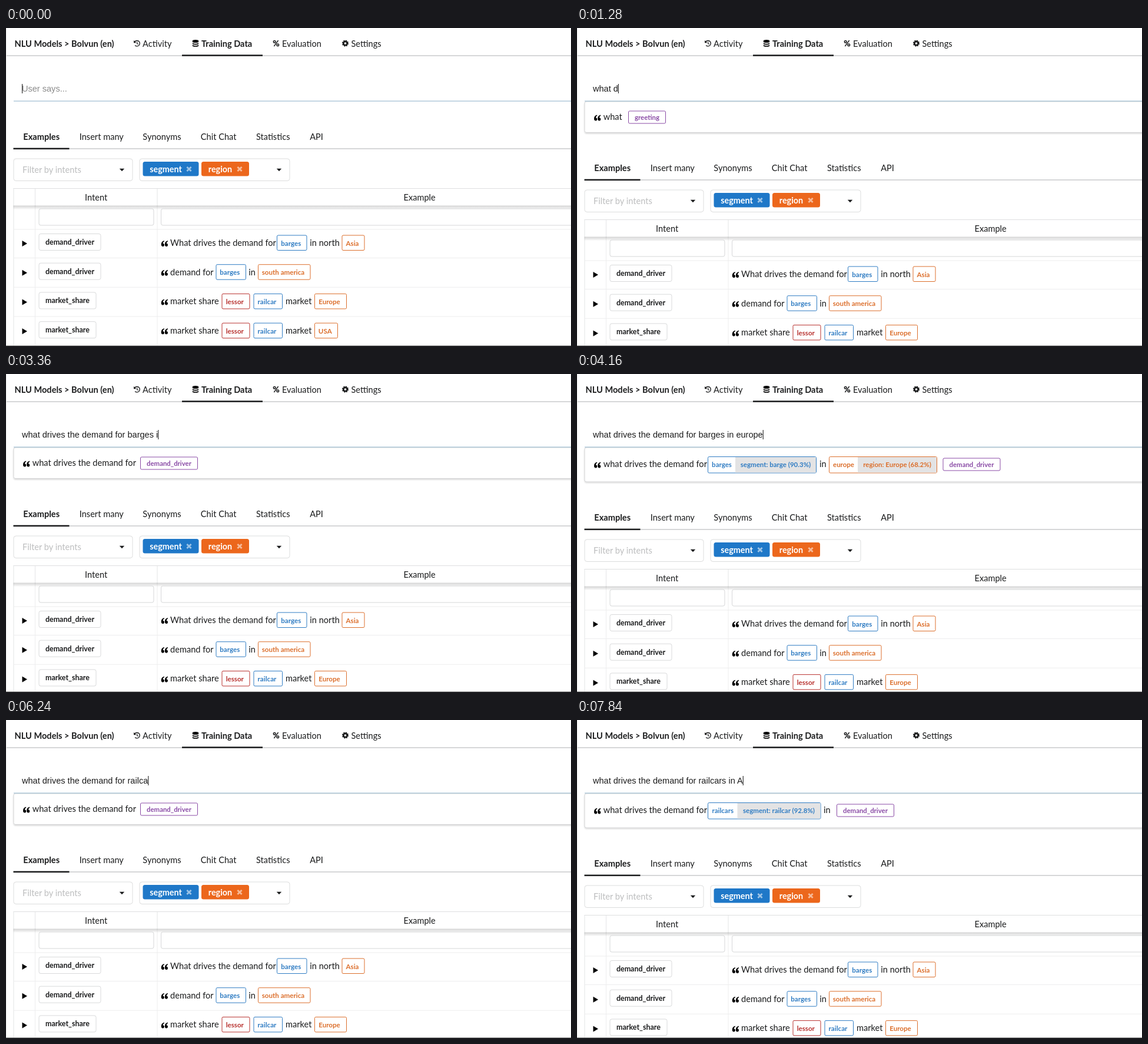
Write an HTML page that moves like this. It is 960 by 540 pixels and loops after 8 s.

```html
<!DOCTYPE html>
<html lang="en">
<head>
<meta charset="utf-8">
<title>Training data</title>
<style>
  html, body { margin: 0; width: 100%; height: 100%; overflow: hidden; background: #fff; }
  svg { display: block; width: 960px; height: 540px; }
  text { font-family: Lato, sans-serif; font-size: 14.6px; fill: #262728; white-space: pre; }
  .b { font-weight: 700; }
  .input { font-family: "Liberation Sans", Arial, sans-serif; font-size: 14.55px; }
  .mid { text-anchor: middle; }
</style>
</head>
<body>
<svg id="stage" viewBox="0 0 960 540"></svg>
<script>
const LOOP = 8000, STEP = 160;
const INK = '#1b1c1d', LINE = '#d6d7d8', SOFT = '#ededee';
const BLUE = '#2f7cc3', ORANGE = '#dc6f2c', RED = '#b8322f', PURPLE = '#8a4ba6';

const rect = (x, y, w, h, fill, extra = '') =>
  `<rect x="${x}" y="${y}" width="${w}" height="${h}" fill="${fill}" ${extra}/>`;
const box = (x, y, w, h, stroke = LINE, r = 3, fill = '#fff') =>
  rect(x + .5, y + .5, w - 1, h - 1, fill, `stroke="${stroke}" rx="${r}"`);
const text = (x, y, s, { cls = '', fill = INK, size = 14.6 } = {}) =>
  `<text x="${x}" y="${y}" class="${cls}" style="font-size:${size}px;fill:${fill}">${s}</text>`;
const path = (d, extra = '') => `<path d="${d}" ${extra}/>`;
const at = (x, y, s) => `<g transform="translate(${x} ${y})">${s}</g>`;

const mark = 'M5 0C1.8 .9 0 3.2 0 6.6C0 8.8 1 10 2.6 10C4.1 10 5.2 9 5.2 7.4C5.2 5.9 4.3 4.9 2.9 4.8C3 3.3 3.8 2.2 5.2 1.5Z';
const quote = (x, y) => at(x, y, path(mark) + at(6.1, 0, path(mark)));
const arrowDown = (x, y) => path(`M${x - 4.2} ${y - 2}h8.4l-4.2 4.4z`, `fill="${INK}"`);
const cross = (x, y) =>
  path(`M${x - 3.6} ${y - 3.6}l7.2 7.2m0 -7.2l-7.2 7.2`, 'stroke="#fff" stroke-opacity=".55" stroke-width="2.8"');

const icons = {
  history: path('M-3.6 -2.8A4.7 4.7 0 1 1 -3.3 3.4', 'fill="none" stroke="#1b1c1d" stroke-width="1.4"') +
    path('M-5.4 -5v4.2h4.2z') +
    path('M.2 -2.6V.4L2.2 1.6', 'fill="none" stroke="#1b1c1d" stroke-width="1.2"'),
  database: [-2.6, .8, 4.2].map(y => path(`M-5.2 ${y - 1.4}Q0 ${y + 1.4} 5.2 ${y - 1.4}V${y}C5.2 ${y + 2.2} -5.2 ${y + 2.2} -5.2 ${y}Z`)).join('') +
    '<ellipse cy="-4.2" rx="5.2" ry="1.9"/>',
  percent: path('M3.6 -5L-3.6 5', 'stroke="#1b1c1d" stroke-width="1.4"') +
    [[-2.8, -2.7], [2.8, 2.7]].map(([x, y]) =>
      `<circle cx="${x}" cy="${y}" r="1.8" fill="none" stroke="#1b1c1d" stroke-width="1.5"/>`).join(''),
  cog: '<circle r="3.2" fill="none" stroke="#1b1c1d" stroke-width="2.7"/>' +
    '<circle r="4.7" fill="none" stroke="#1b1c1d" stroke-width="1.8" stroke-dasharray="2 1.69"/>'
};

function header() {
  const item = (icon, ix, x, s, cls = '') => at(ix, 26, icons[icon]) + text(x, 31.5, s, { cls });
  return rect(0, 46, 960, 2, LINE) + rect(299, 45.3, 137, 2.5, INK) +
    text(14.5, 31.5, 'NLU Models &gt; Bolvun (en)', { cls: 'b' }) +
    item('history', 222.5, 232, 'Activity') +
    item('database', 322, 332, 'Training Data', 'b') +
    item('percent', 459, 469, 'Evaluation') +
    item('cog', 576.5, 586.5, 'Settings');
}

function tabs() {
  const names = [['Insert many', 162.3], ['Synonyms', 265], ['Chit Chat', 361.2], ['Statistics', 453.7], ['API', 527.5]];
  return rect(13, 204, 947, 2, LINE) + rect(12.5, 203.6, 95, 2.5, INK) +
    text(60.2, 190.2, 'Examples', { cls: 'b mid' }) +
    names.map(([s, x]) => text(x, 190.2, s, { cls: 'mid' })).join('');
}

function filters() {
  const chip = (x, w, s, fill, tx, cx) => rect(x, 227, w, 24.5, fill, 'rx="3.5"') +
    text(tx, 244.6, s, { cls: 'b mid', fill: '#fff', size: 14.4 }) + cross(cx, 239.5);
  return box(12.5, 221.5, 203, 38.5, '#dcdddd', 4) +
    text(28, 246, 'Filter by intents', { fill: '#bdbebf' }) + arrowDown(197, 240.8) +
    box(226.5, 221.5, 256, 38.5, '#dcdddd', 4) +
    chip(232.5, 95, 'segment', '#1f78c8', 271.5, 311) +
    chip(332, 81, 'region', '#ec671c', 364, 397) + arrowDown(464, 240.8);
}

const label = (x, y, w, h, s, color, cx) =>
  box(x, y, w, h, color, 2) +
  text(cx, y + h / 2 + 5, s, { cls: 'b mid', fill: color, size: 11.6 });

function row(i, intent, w, parts) {
  const y = 365 + i * 49.7;
  return rect(13, y + 25, 947, 1, SOFT) +
    path(`M27.5 ${y - 4}l8.5 5l-8.5 5z`) +
    box(55.5, y - 16, w, 29, '#d9dadb') +
    text(55.5 + w / 2, y + 2.8, intent, { cls: 'b mid', size: 12.5 }) +
    quote(263.7, y - 4) +
    parts.map(([x, s, bw, color, cx]) => bw
      ? label(x, y - 13.5, bw, 26.5, s, color, cx)
      : text(x, y + 4.8, s)).join('');
}

function table() {
  const market = (region, w, cx) => [[279, 'market share'], [366.5, 'lessor', 48, RED, 388.8],
    [420.5, 'railcar', 49.5, BLUE, 443.5], [475, 'market'], [524, region, w, ORANGE, cx]];
  return rect(12.5, 272, 947.5, 1, '#dedfe0') +
    rect(12.5, 272, 1, 268, '#e4e5e6') +
    [49, 256.5].map(x => rect(x, 273, 1, 30, '#e4e5e6') + rect(x, 303, 1, 240, SOFT)).join('') +
    text(153.2, 293.2, 'Intent', { cls: 'mid' }) + text(702.6, 293.2, 'Example', { cls: 'mid' }) +
    rect(12.5, 301.5, 948, 7, 'url(#fade)') +
    box(55.5, 306.5, 196, 29) + box(263, 306.5, 720, 29) +
    rect(13, 341.5, 947, 1, SOFT) +
    row(0, 'demand_driver', 106, [[279, 'What drives the demand for'], [460, 'barges', 51.5, BLUE, 484.3],
      [516.3, 'in north'], [570.5, 'Asia', 39, ORANGE, 588.5]]) +
    row(1, 'demand_driver', 106, [[279, 'demand for'], [356.5, 'barges', 51.5, BLUE, 380.3],
      [412.3, 'in'], [428, 'south america', 89.5, ORANGE, 471]]) +
    row(2, 'market_share', 98, market('Europe', 55, 549.5)) +
    row(3, 'market_share', 98, market('USA', 40, 542.3));
}

const LEAD = 'what drives the demand for';

// Result panel: leading words, intent tag [name, x, width], entities and plain words.
const plain = (words, x, name = 'demand_driver', w = 98) => ({ words, tag: [name, x, w], parts: [] });
const barge = [222, 185, 47, 'barges', 'segment: barge (90.3%)', BLUE];
const europe = [428, 184, 49, 'europe', 'region: Europe (68.2%)', ORANGE];
const railcar = [222, 192.5, 50.5, 'railcars', 'segment: railcar (92.8%)', BLUE];
const rich = (x, ...parts) => ({ words: LEAD, tag: ['demand_driver', x, 98], parts });

const panels = [
  [0, null],
  [1280, plain('what', 87, 'greeting', 64)],
  [2080, plain('what drives', 129)],
  [2400, plain('what drives the', 153)],
  [2880, plain('what drives the demand', 207)],
  [3040, plain(LEAD, 228)],
  [3520, rich(417, barge)],
  [3680, rich(434, barge, [412, 'in'])],
  [4000, rich(621.5, barge, [412, 'in'], europe)],
  [5760, plain(LEAD, 228)],
  [6880, rich(424, railcar)],
  [7680, rich(441, railcar, [419, 'in'])]
];

function entity([x, w, split, name, value, color]) {
  return box(x, 140, w, 28.5, color, 2) +
    rect(x + split, 141, w - split - 1, 26.5, '#e3e3e4') +
    text(x + 7 + (split - 13) / 2, 157.7, name, { cls: 'b mid', fill: color, size: 11.5 }) +
    text(x + (split + w) / 2 - .5, 157.7, value, { cls: 'b mid', fill: color, size: 11.5 });
}

function panelMarkup(p) {
  if (!p) return '';
  const tall = p.parts.length > 0, mid = tall ? 153.5 : 151.5;
  const [name, x, w] = p.tag;
  return `<g filter="url(#drop)">${box(12.5, 124.5, 960, tall ? 59 : 53.5, '#d2d3d4', 3)}</g>` +
    quote(29, mid - 4) + text(44.7, mid + 4.8, p.words) +
    p.parts.map(a => a.length > 2 ? entity(a) : text(a[0], mid + 4.8, a[1])).join('') +
    box(x, mid - 11, w, 22, PURPLE, 2) +
    text(x + w / 2, mid + 4.6, name, { cls: 'b mid', fill: PURPLE, size: 11.4 });
}

// Typing: [time, number of characters]
const FIRST = LEAD + ' barges in europe', SECOND = LEAD + ' railcars in A';
const keys = [[0, 0], [640, 0], [1280, 6], [3360, 35], [3920, 43], [4640, 43], [5440, 27], [5600, 27],
  [6240, 33], [6720, 36], [7040, 36], [7520, 39], [7840, 40], [LOOP, 40]];

function typedAt(t) {
  const i = keys.findIndex(k => k[0] > t);
  const [t0, n0] = keys[i - 1], [t1, n1] = keys[i];
  const n = Math.round(n0 + (n1 - n0) * (t - t0) / (t1 - t0));
  return (t < 5600 ? FIRST : SECOND).slice(0, n);
}

const stage = document.getElementById('stage');
stage.innerHTML = `<defs>
  <linearGradient id="fade" x2="0" y2="1"><stop stop-color="#000" stop-opacity=".17"/><stop offset="1" stop-color="#000" stop-opacity="0"/></linearGradient>
  <filter id="drop" x="-2%" y="-10%" width="104%" height="130%"><feDropShadow dx="0" dy="1.5" stdDeviation="1.3" flood-opacity=".16"/></filter>
  </defs>` + rect(0, 0, 960, 540, '#fff') + header() +
  `<g id="lower">${tabs()}${filters()}${table()}</g><g id="panel"></g>` +
  rect(13, 123.5, 947, 1.2, '#9fbdd2') +
  '<text id="typed" class="input" x="27" y="108"></text>' +
  rect(27, 95, 1.1, 16, '#222', 'id="caret"') +
  rect(0, 0, 1, 540, '#ececec') + rect(0, 539, 960, 1, '#8c8c8c');

const [lower, panel, typed, caret] = ['lower', 'panel', 'typed', 'caret'].map(id => document.getElementById(id));
let shown;

function render(time) {
  const t = Math.floor(time % LOOP / STEP) * STEP;
  const current = panels.filter(p => p[0] <= t).pop()[1];
  if (current !== shown) {
    shown = current;
    panel.innerHTML = panelMarkup(current);
    const shift = !current ? 0 : current.parts.length ? 59 : 53;
    lower.setAttribute('transform', `translate(0 ${shift})`);
  }
  const value = typedAt(t);
  typed.textContent = value || 'User says...';
  typed.style.fill = value ? '#1c1c1c' : '#8b8b8b';
  caret.setAttribute('x', 27 + (value ? typed.getComputedTextLength() : 0));
}

function tick() {
  render(performance.now());
  requestAnimationFrame(tick);
}
tick();
</script>
</body>
</html>
```
